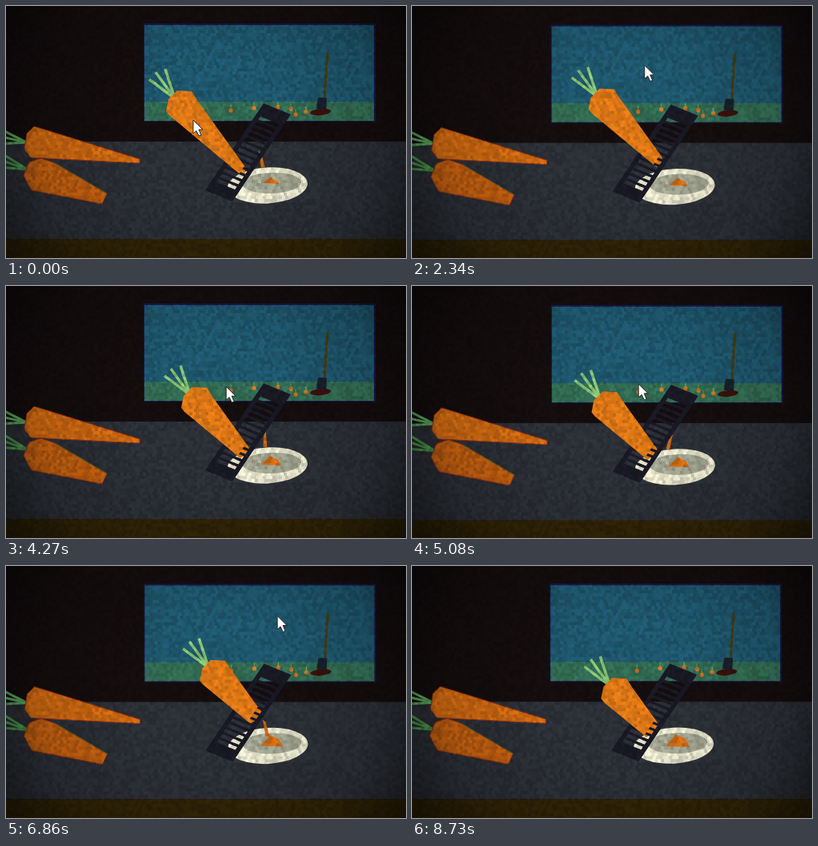
An HTML page with a canvas that plays this animation: 500 by 316 pixels, repeating every 8770 ms.

```html
<!DOCTYPE html>
<html lang="en">
<head>
<meta charset="utf-8">
<title>Grating carrots</title>
<style>
html, body { margin: 0; width: 100%; height: 100%; overflow: hidden; background: #0c0808; }
canvas { display: block; }
</style>
</head>
<body>
<canvas id="stage" width="500" height="316"></canvas>
<script>
const W = 500, H = 316, LOOP = 8770, STEP = 137.2, STEPS = 64, STROKES = 11;
const ctx = document.getElementById('stage').getContext('2d');

function seeded(seed) {
  return () => (seed = seed * 16807 % 2147483647) / 2147483647;
}

// The hand rubs the carrot up and down in strokes that quicken slightly;
// each downward half shaves some of it off.
function poseAt(step) {
  const progress = step / STEPS;
  const phase = STROKES * progress - .36 * Math.sin(Math.PI * progress);
  const stroke = Math.floor(phase + 1e-6), part = phase - stroke;
  const up = Math.sin(Math.PI * part) ** 4;
  const shaved = (stroke + Math.max(0, 2 * part - 1)) / STROKES;
  const swing = Math.cos(2 * Math.PI * step * 3 / 31);
  return {
    progress, phase,
    left: 1 - .425 * (1 - (1 - shaved) ** 1.35),
    lift: up * (25 + 12 * progress),
    pointerX: 234 + 85 * progress + 56 * up,
    pointerY: 143 - 35 * progress - (108 - 40 * progress) * up,
    swayX: -swing,
    swayY: 1 - swing
  };
}

function trace(points) {
  points.forEach(([x, y], i) => i ? ctx.lineTo(x, y) : ctx.moveTo(x, y));
  ctx.closePath();
}

function poly(color, points, edge) {
  ctx.beginPath();
  trace(points);
  ctx.fillStyle = color;
  ctx.fill();
  if (edge) {
    ctx.strokeStyle = edge;
    ctx.lineWidth = 1;
    ctx.stroke();
  }
}

function line(color, width, x1, y1, x2, y2) {
  ctx.beginPath();
  ctx.moveTo(x1, y1);
  ctx.lineTo(x2, y2);
  ctx.strokeStyle = color;
  ctx.lineWidth = width;
  ctx.stroke();
}

function oval(color, x, y, rx, ry, tilt = 0) {
  ctx.beginPath();
  ctx.ellipse(x, y, rx, ry, tilt, 0, Math.PI * 2);
  ctx.fillStyle = color;
  ctx.fill();
}

function rect(color, x, y, w, h) {
  ctx.fillStyle = color;
  ctx.fillRect(x, y, w, h);
}

function makeGrain() {
  const layer = document.createElement('canvas');
  layer.width = W + 20;
  layer.height = H + 20;
  const g = layer.getContext('2d');
  const random = seeded(7);
  for (let y = 0; y < layer.height; y += 4)
    for (let x = 0; x < layer.width; x += 4) {
      g.fillStyle = `rgba(0,0,0,${random() * .22})`;
      g.fillRect(x + (y / 4 % 2) * 2, y, 4, 4);
    }
  return layer;
}
const grain = makeGrain();

const shade = ctx.createRadialGradient(260, 155, 90, 250, 158, 310);
shade.addColorStop(0, 'rgba(0,0,0,0)');
shade.addColorStop(.55, 'rgba(0,0,0,.17)');
shade.addColorStop(1, 'rgba(0,0,0,.6)');

function drawRoom() {
  rect('#170f10', -9, -9, 520, 340);
  rect('#31353d', -9, 170, 520, 122);
  rect('#362808', -9, 292, 520, 40);
  rect('#1b1a55', 173, 22, 290, 123);
  rect('#22617a', 174, 24, 287, 97);
  rect('#38785d', 174, 120, 287, 24);
  for (const [x, y] of [[282, 131], [311, 128], [341, 127], [357, 129], [363, 136], [376, 133]]) {
    line('#6fae6f', 1.2, x, y - 7, x, y);
    oval('#e27d22', x, y, 2.6, 2.8);
  }
  line('#4e4514', 3, 403, 58, 399, 116);
  oval('#45130f', 394, 133, 13, 4, -.1);
  poly('#1b2531', [[391, 115], [402, 115], [401, 130], [389, 129]]);
}

function drawSpareCarrots() {
  for (let i = -1; i <= 1; i++) {
    line('#68c06a', 3, -9, 163 + i * 10, 27, 171);
    line('#55a854', 3, -9, 192 + i * 10, 28, 205);
  }
  poly('#ec7814', [[24, 180], [27, 160], [36, 151], [46, 154], [168, 192], [168, 197], [32, 190]], '#b03a16');
  poly('#d96a12', [[23, 213], [30, 196], [45, 191], [64, 198], [127, 235], [121, 248], [33, 231]], '#b03a16');
  line('#4d7032', 1, 64, 198, 127, 235);
}

function drawBowl(grown) {
  oval('#fffde2', 328, 225, 50, 22.5, -.06);
  oval('#b2b59f', 333, 222, 37, 13, -.03);
  poly('#e87818', [[322 - 4 * grown, 222 + 4 * grown], [331, 215 - 4 * grown],
    [341 + grown, 220 - 4 * grown], [342 + 6 * grown, 223 + 4 * grown]]);
}

function drawShavings(phase) {
  const age = (phase + .12) % 1 / .7;
  if (age > 1) return;
  const random = seeded(31 + 977 * Math.floor(phase + .12));
  const count = 1 + Math.round(random() * 2);
  for (let i = 0; i < count; i++) {
    ctx.save();
    ctx.translate(318 + 8 * age + random() * 8, 190 + 20 * age + i * 6);
    ctx.rotate((random() - .5) * 1.6 * (1 - age));
    poly('#e07218', [[-2, -12], [1, -9], [4, 10], [-1, 9]]);
    ctx.restore();
  }
}

// Position on the grater: u across, v along, both 0 to 1.
const onGrater = (u, v) => [323 - 73 * v + 34 * u, 122 + 109 * v + 14 * u];
const graterBox = (u1, v1, u2, v2) =>
  trace([onGrater(u1, v1), onGrater(u2, v1), onGrater(u2, v2), onGrater(u1, v2)]);

function drawGrater() {
  ctx.beginPath();
  graterBox(0, 0, 1, 1);
  for (let i = 0; i < 13; i++) graterBox(.16, .13 + i * .06, .85, .165 + i * .06);
  ctx.fillStyle = '#1c1c29';
  ctx.fill('evenodd');
}

// The far side of the grater bites into the carrot's end.
function drawTeeth() {
  ctx.save();
  ctx.beginPath();
  graterBox(.66, 0, 1, 1);
  ctx.clip();
  drawGrater();
  ctx.restore();
}

function drawCarrot(left, lift) {
  const along = (x, y, t) => [x[0] + y[0] * t, x[1] + y[1] * t];
  const right = left - .04;
  const tipR = along([25, 12], [63, 88], right), tipL = along([-12, 28], [94, 80], left);
  ctx.save();
  ctx.translate(215 + (1 - left) * 81 + lift * .56, 106 + (1 - left) * 88 - lift * .83);
  for (const [x, y] of [[-35, -14], [-27, -23], [-15, -27]]) line('#96d880', 3.5, -3, 10, x, y);
  poly('#f58418', [[-14, 26], [-11, 11], [0, 0], [18, 1], [25, 12], tipR,
    [tipR[0] - 1, tipR[1] + 7], tipL, [-10, 31]]);
  ctx.restore();
}

function drawPointer(x, y) {
  ctx.save();
  ctx.translate(x, y);
  poly('#fff', [[0, 0], [0, 17], [4, 13.5], [7, 20], [10, 19], [7, 12], [12, 12]], '#222');
  ctx.restore();
}

function draw(time) {
  const step = Math.min(STEPS, Math.floor((time + 5) / STEP));
  const pose = poseAt(step);
  ctx.save();
  ctx.translate(pose.swayX, pose.swayY);
  drawRoom();
  drawSpareCarrots();
  drawBowl(pose.progress);
  drawShavings(pose.phase);
  drawGrater();
  drawCarrot(pose.left, pose.lift);
  drawTeeth();
  ctx.drawImage(grain, -10, -10);
  ctx.restore();
  rect(shade, 0, 0, W, H);
  if (step < STEPS - 1) drawPointer(pose.pointerX, pose.pointerY);
}

const begin = performance.now();
function tick(now) {
  draw(Math.max(0, now - begin) % LOOP);
  requestAnimationFrame(tick);
}
tick(begin);
</script>
</body>
</html>
```
